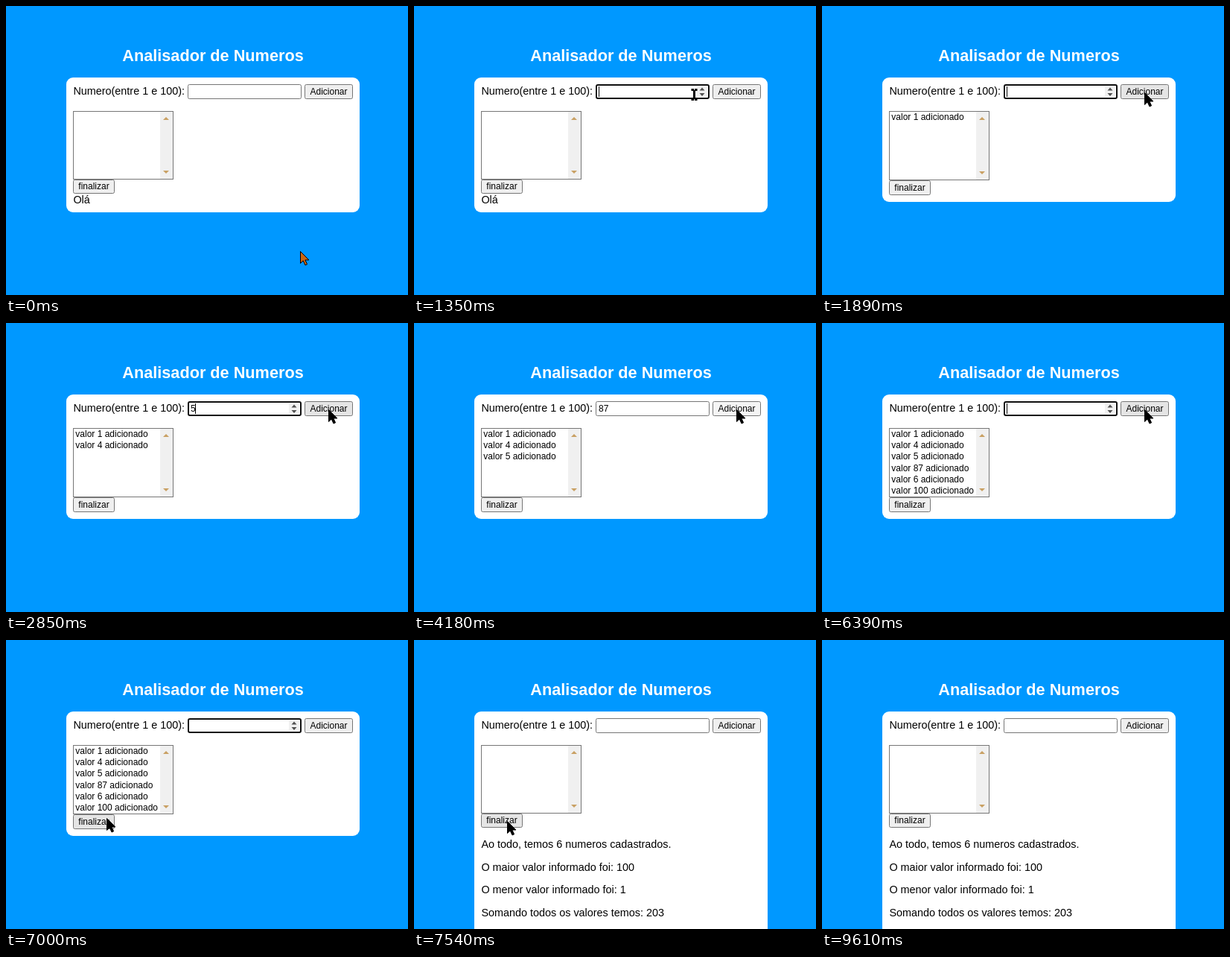
Write an HTML page that moves like this. It is 540 px wide and 388 px high and loops after 9.87 s.

```html
<!DOCTYPE html>
<html lang="pt">
<head>
<meta charset="utf-8">
<title>Analisador de Numeros</title>
<style>
  html, body { margin: 0; width: 100%; height: 100%; overflow: hidden; background: #0098ff; }
  svg { display: block; font: 14.4px "Liberation Sans", Arial, sans-serif; }
  .title { font-size: 21.7px; font-weight: bold; fill: #fff; text-anchor: middle; }
  .small { font-size: 12px; }
  .middle { text-anchor: middle; }
  .box { fill: #fff; stroke: #767676; }
  .button { fill: #efefef; stroke: #767676; }
</style>
</head>
<body>
<svg width="540" height="388" viewBox="0 0 540 388">
  <text class="title" x="278" y="73.5">Analisador de Numeros</text>
  <rect id="panel" x="81" y="96" width="394" rx="9" fill="#fff"/>
  <text x="90.4" y="119">Numero(entre 1 e 100):</text>

  <rect id="field" class="box" rx="2"/>
  <g id="spinner">
    <path d="M380 108h14v14h-14z" fill="#f1f1f1"/>
    <path d="M383.5 113.5h7l-3.5-4zM383.5 117h7l-3.5 4z" fill="#505050"/>
  </g>
  <text id="value" class="small" x="248" y="119"></text>
  <path id="caret" d="M0 108v14" stroke="#000"/>

  <rect id="add" class="button" x="401.5" y="105.5" width="64" height="19" rx="2"/>
  <text class="small middle" x="433.5" y="119">Adicionar</text>

  <rect id="list" class="box" x="90.5" y="141.5" width="134"/>
  <rect id="track" x="207" y="142" width="17" fill="#f0f0f0"/>
  <path d="M211 153h8l-4-4z" fill="#c9a063"/>
  <path id="down" d="M211 221h8l-4 4z" fill="#c9a063"/>
  <g id="rows" class="small"></g>

  <rect id="finish" class="button" x="90.5" width="55" rx="2"/>
  <text id="finishLabel" class="small middle" x="118">finalizar</text>
  <text id="hello" x="90.4" y="265">Olá</text>
  <g id="results"></g>

  <path id="arrow" d="M.5.5v16l3.7-3.5 2.8 6 2.6-1.2-2.7-5.8h5z" stroke="#000"/>
  <path id="beam" d="M-4-8h3.5v2h1v-2h3.5v3h-2.5v10h2.5v3h-3.5v-2h-1v2h-3.5v-3h2.5v-10h-2.5z"/>
</svg>
<script>
const LOOP = 9870, TICK = 67.4;
const FIRST_ADD = 1890, DONE = 7540, CURSOR_GONE = 9610;
const numbers = [1, 4, 5, 87, 6, 100];

// time, field text, field focused, numbers listed
const states = [
  [0, '', false, 0],
  [1210, '', true, 0], [1550, '1', true, 0], [1820, '1', false, 0],
  [1890, '', true, 1], [2220, '4', true, 1], [2550, '4', false, 1],
  [2620, '', true, 2], [2850, '5', true, 2], [3110, '5', false, 2],
  [3250, '', true, 3], [3710, '8', true, 3], [3980, '87', true, 3], [4180, '87', false, 3],
  [4240, '', true, 4], [4640, '6', true, 4], [5110, '6', false, 4],
  [5180, '', true, 5], [5640, '1', true, 5], [5850, '10', true, 5], [6050, '100', true, 5], [6250, '100', false, 5],
  [6320, '', true, 6], [7480, '', false, 6],
  [DONE, '', false, 0]
];

// time, x, y of the pointer
const path = [
  [0, 395, 329], [470, 388, 220], [810, 376, 105], [950, 376, 119], [1350, 376, 119],
  [1750, 433, 116], [6320, 433, 116], [7000, 135, 239], [7210, 126, 242], [7280, 125, 243],
  [8930, 125, 243], [9000, 125, 241], [9330, 125, 241], [9540, 207, 274], [LOOP, 207, 274]
];

const $ = id => document.getElementById(id);
const set = (id, attrs) => Object.entries(attrs).forEach(([name, v]) => $(id).setAttribute(name, v));
const show = (id, visible) => set(id, { visibility: visible ? 'visible' : 'hidden' });
const line = (text, x, y) => `<text x="${x}" y="${y}">${text}</text>`;

$('rows').innerHTML = numbers.map((n, i) => line(`valor ${n} adicionado`, 93.3, Math.round(153 + 15.2 * i))).join('');
$('results').innerHTML = [
  `Ao todo, temos ${numbers.length} numeros cadastrados.`,
  `O maior valor informado foi: ${Math.max(...numbers)}`,
  `O menor valor informado foi: ${Math.min(...numbers)}`,
  `Somando todos os valores temos: ${numbers.reduce((a, b) => a + b)}`
].map((text, i) => line(text, 90.4, Math.round(279.2 + 30.6 * i))).join('');

function pointer(t) {
  const time = Math.floor((t + 12) / TICK) * TICK;
  const i = path.findIndex(p => p[0] > time);
  const [t0, x0, y0] = path[i - 1], [t1, x1, y1] = path[i];
  const u = (time - t0) / (t1 - t0), k = u * u * (3 - 2 * u);
  return [Math.round(x0 + (x1 - x0) * k), Math.round(y0 + (y1 - y0) * k)];
}

function draw(t) {
  const [since, text, focused, count] = states.findLast(s => s[0] <= t);
  const done = t >= DONE, greeting = t < FIRST_ADD;
  const grow = count > 0 ? 1 : 0;
  const [x, y] = pointer(t);
  const present = t < CURSOR_GONE;
  const over = (left, top, right, bottom) => present && x >= left && x <= right && y >= top && y <= bottom;
  const overField = over(244, 105, 397, 125);
  const buttonFill = hover => !hover ? '#efefef' : !focused && !done ? '#f5f5f5' : '#e5e5e5';

  const bottom = done ? 420 : greeting ? 277 : 263;
  set('panel', { height: bottom - 96 });
  set('field', focused
    ? { x: 245, y: 106, width: 151, height: 18, stroke: '#101010', style: 'stroke:#101010;stroke-width:2' }
    : { x: 244.5, y: 105.5, width: 152, height: 19, style: '' });
  show('spinner', focused || overField);
  $('value').textContent = text;
  set('caret', { transform: `translate(${248.5 + Math.round(text.length * 6.67 - 0.4)})` });
  show('caret', focused && t - since < 500);

  set('list', { height: 91 + grow });
  set('track', { height: 90 + grow });
  set('down', { transform: `translate(0 ${grow})` });
  [...$('rows').children].forEach((row, i) => row.setAttribute('visibility', i < count ? 'visible' : 'hidden'));

  set('add', { style: `fill:${buttonFill(over(401, 105, 466, 125))}` });
  set('finish', { y: 233.5 + grow, height: 18 + grow, style: `fill:${buttonFill(over(90, 233, 146, 254))}` });
  set('finishLabel', { y: 246 + 2 * grow });
  show('hello', greeting);
  show('results', done);

  // the pointer shows the inverse of the colour below it
  const onPanel = over(81, 96, 475, bottom);
  set('arrow', { transform: `translate(${x} ${y})`, fill: onPanel ? '#000' : '#cc6611' });
  set('beam', { transform: `translate(${x + 0.5} ${y})` });
  show('arrow', present && !overField);
  show('beam', overField);
}

const start = performance.now();
function frame() {
  draw((performance.now() - start) % LOOP);
  requestAnimationFrame(frame);
}
frame();
</script>
</body>
</html>
```
